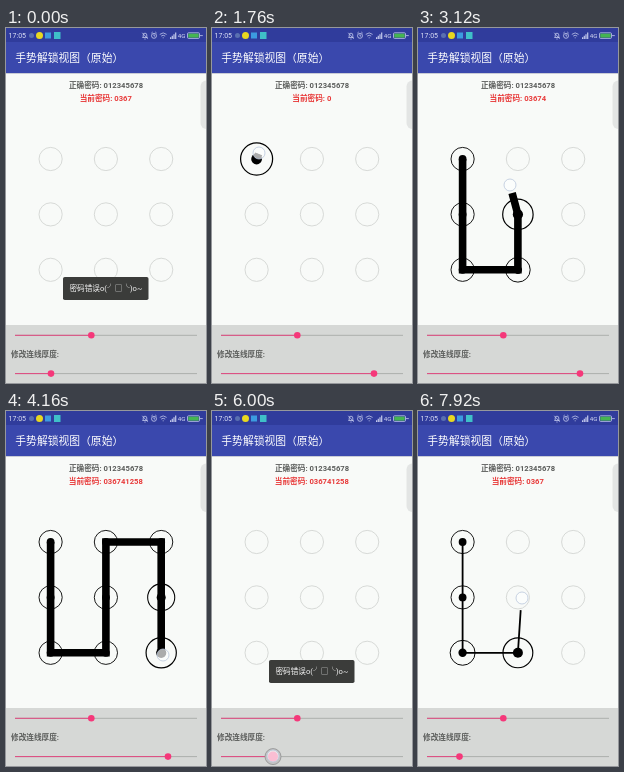
An HTML page that plays this animation: 200x355 px, repeating every 8 s.

```html
<!DOCTYPE html>
<html lang="zh-CN">
<head>
<meta charset="utf-8">
<title>手势解锁</title>
<style>
  html, body { margin: 0; width: 100%; height: 100%; overflow: hidden; background: #f8faf8; }
  svg { display: block; width: 100vw; height: 100vh; }
  text { font-family: Roboto, "Noto Sans CJK SC", "Noto Sans CJK", sans-serif; font-size: 7.65px; }
  .cjk { font-family: "Noto Sans CJK SC", "Noto Sans CJK", sans-serif; }
  .label { font-weight: 700; fill: #5b5d5b; }
  .mid { text-anchor: middle; }
  .status { fill: none; stroke: #c3c9ec; stroke-width: .8; }
  .pink { fill: #f5387a; }
  .track { stroke: #a9aba9; stroke-width: .9; }
  .progress { stroke: #e0487f; stroke-width: 1; }
</style>
</head>
<body>
<svg viewBox="0 0 200 355" preserveAspectRatio="none">
  <rect width="200" height="355" fill="#f8faf8"/>
  <rect width="200" height="45" fill="#3a48ad"/>
  <rect y="45" width="200" height="1" fill="#c9ccd6"/>
  <rect width="200" height="14" fill="#303c9c"/>

  <text x="2.6" y="10.2" fill="#dfe3f8" style="font-size:7px">17:05</text>
  <circle cx="25.5" cy="7.5" r="2.5" fill="#5a70b0"/>
  <circle cx="33.5" cy="7.5" r="3.5" fill="#e8d820"/>
  <rect x="39" y="4.5" width="6" height="6" fill="#3c9be0"/>
  <rect x="48" y="4" width="6.5" height="7" fill="#3fc0c8"/>
  <g class="status">
    <path d="M136.3 9.5h5.4M137.2 9.3V7a1.8 1.8 0 0 1 3.6 0v2.3M138.4 11h1.2M136.3 4.8l5.4 6"/>
    <circle cx="148" cy="7.8" r="2.5"/>
    <path d="M148 6.2v1.8h1.2M145.3 5.2l1.4-1.2M150.7 5.2l-1.4-1.2"/>
    <path d="M153.8 6.4q3.4-3 6.8 0M155.2 8.1q2-1.7 4 0M156.7 9.8h1"/>
    <path d="M164.6 11V9.3M166.3 11V7.8M168 11V6.3M169.7 11V4.6" stroke-width="1.2"/>
    <rect x="181.5" y="4.8" width="12" height="5.6" rx="1"/>
    <path d="M194 7.6h2.8"/>
  </g>
  <rect x="182.3" y="5.6" width="10.4" height="4" fill="#45b552"/>
  <text x="171.8" y="10" fill="#dfe3f8" style="font-size:6.2px">4G</text>
  <text class="cjk" x="9.3" y="33.8" fill="#fff" style="font-size:10.8px">手势解锁视图（原始）</text>

  <text class="label mid" x="100" y="59.8">正确密码: 012345678</text>
  <text class="label mid" x="99.8" y="73" style="fill:#e83a3a">当前密码: <tspan id="code"></tspan></text>
  <rect x="194.5" y="52.5" width="14" height="48.5" rx="6" fill="#e3e5e4"/>

  <g id="nodes"></g>
  <polyline id="line" fill="none" stroke="#000" stroke-linejoin="miter"/>

  <rect y="297" width="200" height="58" fill="#d6d8d6"/>
  <path class="track" d="M9 307.3H191M9 345.6H191"/>
  <path class="progress" d="M9 307.3H85"/>
  <circle class="pink" cx="85.3" cy="307.3" r="3.3"/>
  <text class="label" x="5" y="329.2">修改连线厚度:</text>
  <path class="progress" id="progress"/>
  <circle id="halo" cy="345.6" r="8" fill="#c3c2c3" stroke="#8e9090" stroke-width=".8"/>
  <circle class="pink" id="thumb" cy="345.6"/>

  <g id="toast">
    <rect x="57" y="249" width="85.5" height="23" rx="1.8" fill="#3b3c3a"/>
    <text class="mid" x="99.8" y="263.2" fill="#f4f4f4">密码错误o(<tspan class="cjk">╯□╰</tspan>)o~</text>
  </g>
  <circle id="touch" r="6" fill="#fcfdfe" fill-opacity=".68" stroke="#bac8dc" stroke-width=".8"/>
</svg>
<script>
const LOOP = 8000, STEP = 80, LAG = 50, RADIUS = 11.6;
const $ = id => document.getElementById(id);
const set = (el, attrs) => { for (const k in attrs) el.setAttribute(k, attrs[k]); };

// Piecewise linear track through [time, ...values] keys.
function along(keys, t) {
  if (t <= keys[0][0]) return keys[0].slice(1);
  for (let i = 1; i < keys.length; i++) {
    const a = keys[i - 1], b = keys[i];
    if (t <= b[0]) {
      const k = (t - a[0]) / (b[0] - a[0]);
      return a.slice(1).map((v, j) => v + (b[j + 1] - v) * k);
    }
  }
  return keys[keys.length - 1].slice(1);
}

const centers = Array.from({ length: 9 }, (_, i) =>
  [44.6 + 55.3 * (i % 3), 131 + 55.4 * Math.floor(i / 3)]);

const strokes = [
  { end: 4380, width: 7.6, keys: [
    [1640, 46, 127], [1760, 47, 125], [1840, 45, 131], [2400, 44, 240], [2680, 98, 243],
    [2930, 100, 187], [3120, 92, 157], [3300, 99, 130], [3560, 152, 129],
    [3830, 156, 186], [4080, 155, 241], [4160, 157, 244]] },
  { end: LOOP, width: 1.8, keys: [
    [7070, 45, 130], [7280, 41.5, 182], [7480, 44, 242], [7690, 98, 243], [7920, 104, 187]] }
];

// Record when each node is first reached.
for (const s of strokes) {
  s.start = s.keys[0][0];
  s.hits = [];
  for (let t = s.start; t < s.end; t += 4) {
    const [x, y] = along(s.keys, t - LAG);
    const node = centers.findIndex(c => Math.hypot(c[0] - x, c[1] - y) < RADIUS);
    if (node >= 0 && !s.hits.some(h => h.node === node)) s.hits.push({ node, t });
  }
}

const pulse = [[0, 1], [100, 1.4], [500, 1]];
const slider = [[0, 45], [150, 45], [1250, 162], [5200, 162], [6000, 61], [6300, 41.5]];
const drags = [[80, 1380], [5120, 6440]];
const toastAlpha = [[0, 1], [900, 1], [1350, 0], [4440, 0], [4880, 1], [6520, 1], [6960, 0]];

const nodes = centers.map(([cx, cy]) => {
  const make = () => {
    const c = document.createElementNS("http://www.w3.org/2000/svg", "circle");
    set(c, { cx, cy });
    return $("nodes").appendChild(c);
  };
  return { ring: make(), dot: make() };
});

function draw(t) {
  const stroke = strokes.find(s => t >= s.start && t < s.end);
  const reached = s => s.hits.filter(h => h.t <= t);
  const path = stroke ? reached(stroke) : [];

  nodes.forEach(({ ring, dot }, i) => {
    const hit = path.find(h => h.node === i);
    const scale = hit ? along(pulse, t - hit.t)[0] : 1;
    set(ring, { r: RADIUS * scale, fill: "none", stroke: hit ? "#000" : "#cfd1cf",
      "stroke-width": hit ? .9 * scale : .8 });
    set(dot, { r: hit ? 3.9 * scale : 0 });
  });

  const points = path.map(h => centers[h.node]);
  if (stroke) points.push(along(stroke.keys, t - LAG));
  set($("line"), { points: points.join(" "), "stroke-width": stroke ? stroke.width : 0 });

  const latest = strokes.filter(s => t >= s.start).pop();
  $("code").textContent = latest ? reached(latest).map(h => h.node).join("") : "0367";

  const [x] = along(slider, t);
  const dragging = drags.some(([a, b]) => t >= a && t < b);
  set($("progress"), { d: `M9 345.6H${x}` });
  set($("thumb"), { cx: x, r: dragging ? 5 : 3.3 });
  set($("halo"), { cx: x, opacity: dragging ? 1 : 0 });
  set($("toast"), { opacity: along(toastAlpha, t)[0] });

  const [cx, cy] = stroke ? along(stroke.keys, t) : [x, 345];
  set($("touch"), { cx, cy, opacity: stroke || dragging ? 1 : 0 });
}

const begin = performance.now();
function tick() {
  const t = (performance.now() - begin) % LOOP;
  draw(Math.floor(t / STEP) * STEP);
  requestAnimationFrame(tick);
}
tick();
</script>
</body>
</html>
```
